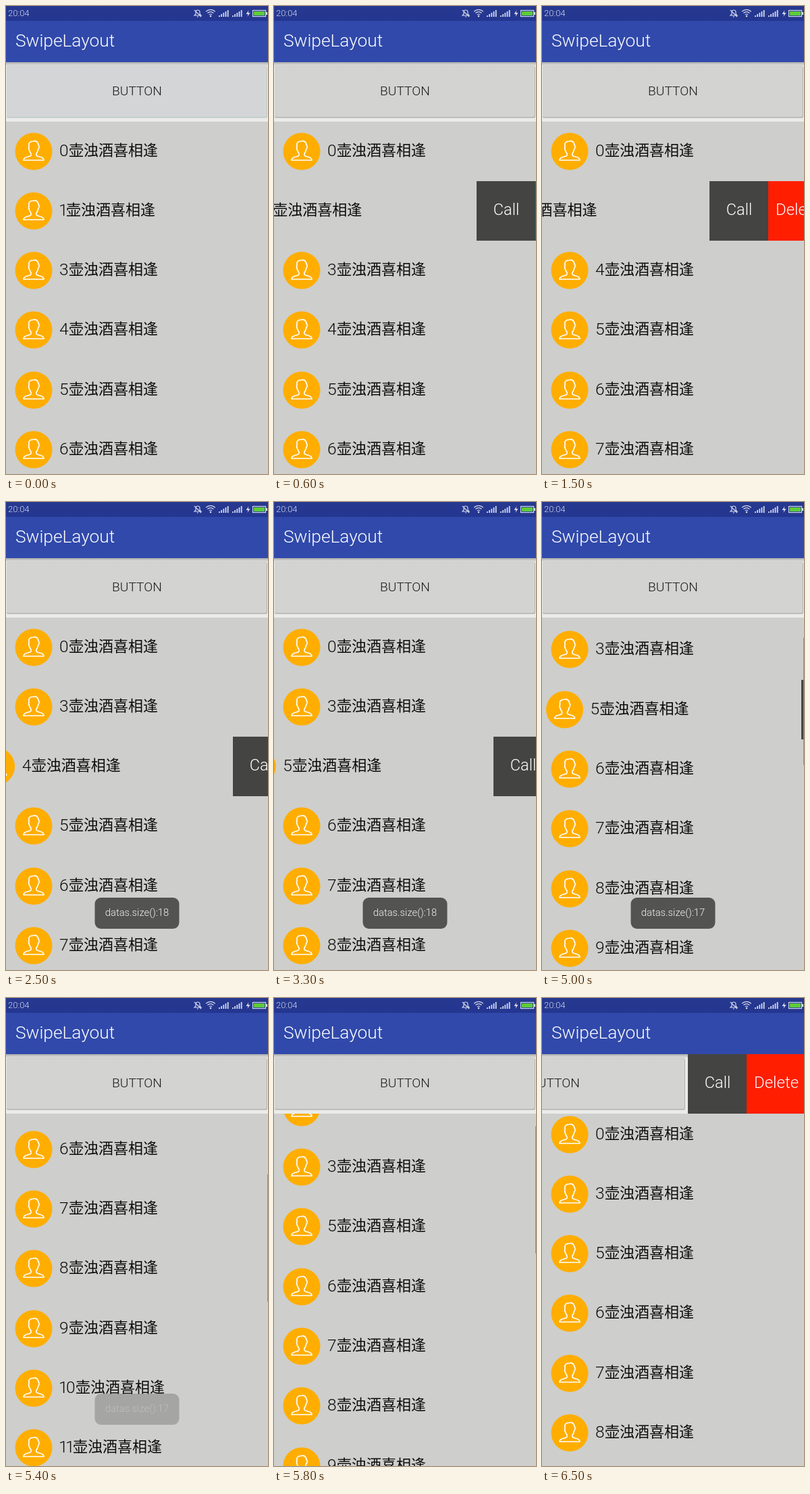
Recreate the animation shown at these times as an HTML page with a canvas. Size 388 px wide and 692 px high, loop 8000 ms.

```html
<!DOCTYPE html>
<html lang="zh">
<head>
<meta charset="utf-8">
<title>SwipeLayout</title>
<style>
html, body { margin: 0; width: 100%; height: 100%; overflow: hidden; background: #cececc; }
canvas { display: block; }
</style>
</head>
<body>
<canvas id="stage" width="388" height="692"></canvas>
<script>
const W = 388, H = 692, LOOP = 8000, STEP = 100;
const LIST_TOP = 171, ROW = 88.3, MENU_X = 391, OPEN = 175;
const LATIN = 'Roboto, sans-serif';
const CJK = '"Noto Sans CJK SC", "Noto Sans CJK", sans-serif';
const c = document.getElementById('stage').getContext('2d');

const person = new Path2D('M-4 3C-3 7-5 7-9 8C-13 9-15 10-15 13H15C15 10 13 9 9 8C5 7 3 7 4 3C6 1 6-1 7-4C9-5 8-8 7-10C6-14 3-16-1-15C-6-15-8-12-7-8C-7-6-8-5-7-3C-6-1-6 1-4 3Z');
const bell = new Path2D('M-5 3H5L3 1V-2C3-6-3-6-3-2V1ZM-1 5H1M-5-5L5 5');
const bolt = new Path2D('M1-5L-3 1H0L-1 5L3-1H0Z');

function box(x, y, w, h, color) {
  c.fillStyle = color;
  c.fillRect(x, y, w, h);
}

function roundBox(x, y, w, h, r, color) {
  c.fillStyle = color;
  c.beginPath();
  c.roundRect(x, y, w, h, r);
  c.fill();
}

function text(str, x, y, size, color, align = 'left', family = LATIN) {
  c.font = `${family === LATIN ? 300 : 400} ${size}px ${family}`;
  c.fillStyle = color;
  c.textAlign = align;
  c.fillText(str, x, y);
}

function shade(y0, y1, from, to) {
  const g = c.createLinearGradient(0, y0, 0, y1);
  g.addColorStop(0, from);
  g.addColorStop(1, to);
  box(0, y0, W, y1 - y0, g);
}

const progress = (t, from, to) => Math.min(1, Math.max(0, (t - from) / (to - from)));
const smooth = p => p * p * (3 - 2 * p);

// A finger drags a row open; a released row springs shut.
const drag = (t, from, to) => OPEN * smooth(progress(t, from, to));
const shut = (t, from) => OPEN * (1 - progress(t, from, from + 512)) ** 5;

const firstSwipe = t => t < 1500 ? drag(t, 180, 1000) : shut(t, 1480);

function secondSwipe(t) {
  if (t < 3300) return drag(t, 2380, 2700);
  if (t < 3900) return shut(t, 3209);
  return t < 4800 ? drag(t, 3880, 4300) : shut(t, 4760);
}

const buttonSwipe = t => drag(t, 5980, 6500);
const scrollAt = t => 267 * smooth(progress(t, 4700, 5500)) - 254 * smooth(progress(t, 5500, 5900));
const barAlpha = t => t < 4800 ? 0 : 1 - progress(t, 6100, 6500);

function toastAlpha(t) {
  if (t < 3600) return progress(t, 1500, 2000) - progress(t, 3300, 3600);
  return progress(t, 3500, 3800) - progress(t, 5200, 5500);
}

function drawMenu(y, off) {
  if (off < .5) return;
  const x = Math.round(MENU_X - off);
  box(x, y, 87, 88, '#444442');
  box(x + 87, y, 88, 88, '#ff1e00');
  text('Call', x + 44, y + 50, 23.5, '#fff', 'center');
  text('Delete', x + 131, y + 50, 24, '#fff', 'center');
}

function drawRow(id, y, off) {
  const x = -off;
  c.fillStyle = '#ffae00';
  c.beginPath();
  c.arc(x + 41, y + 44, 27.5, 0, 7);
  c.fill();
  c.save();
  c.translate(x + 41, y + 44);
  c.strokeStyle = '#fff';
  c.lineWidth = 1.7;
  c.lineJoin = 'round';
  c.stroke(person);
  c.restore();

  let pen = x + 79;
  for (const d of String(id)) {
    const one = d === '1';
    text(d, pen - (one ? 1 : 0), y + 51, 24.5, '#0c0c0c');
    pen += one ? 10 : 14;
  }
  text('壶浊酒喜相逢', pen, y + 50, 22, '#0c0c0c', 'left', CJK);
}

function drawList(t) {
  const scroll = scrollAt(t);
  const swipes = { 1: firstSwipe(t), 2: secondSwipe(t) };
  const gone = [2];
  if (t >= 1500) gone.push(1);
  if (t >= 3300) gone.push(4);
  const ids = [...Array(20).keys()].filter(id => !gone.includes(id));

  c.save();
  c.beginPath();
  c.rect(0, LIST_TOP, W, H - LIST_TOP);
  c.clip();
  ids.forEach((id, i) => {
    const y = Math.floor(LIST_TOP + i * ROW - scroll), off = swipes[i] || 0;
    if (y < LIST_TOP - ROW || y > H) return;
    drawRow(id, y, off);
    drawMenu(y, off);
  });
  c.globalAlpha = barAlpha(t);
  box(387, LIST_TOP + scroll * .352, 1, 188, '#8b8b89');
  c.restore();
}

function drawButton(t) {
  const off = buttonSwipe(t);
  box(0, 83, W, 88, '#ebebea');
  roundBox(1 - off, 89, 386, 76.5, 2, t < 300 ? '#bccac5' : '#b0b0ae');
  roundBox(1 - off, 88, 385, 76, 2, t < 300 ? '#d4d5d6' : '#d3d3d1');
  text('BUTTON', 194 - off, 132, 19.2, '#1c1c1c', 'center');
  shade(83, 89, 'rgba(90,90,90,.45)', 'rgba(90,90,90,0)');
  drawMenu(83, off);
}

function drawBars() {
  shade(0, 22, '#26388f', '#243690');
  box(0, 22, W, 61, '#3049ab');
  text('SwipeLayout', 14, 60, 26.3, '#fff');

  const ink = '#d3d8ec';
  text('20:04', 3, 15, 13, ink);
  c.strokeStyle = ink;
  c.lineWidth = 1.2;
  c.save();
  c.translate(284, 11);
  c.stroke(bell);
  c.restore();
  for (const r of [3, 6.3, 9.6]) {
    c.beginPath();
    c.arc(303, 15, r, -Math.PI * .75, -Math.PI * .25);
    c.stroke();
  }
  c.fillStyle = ink;
  c.beginPath();
  c.arc(303, 15, 1.3, 0, 7);
  c.fill();
  for (const x of [315, 335])
    for (let i = 0; i < 5; i++) box(x + i * 3.2, 14 - i * 2, 1.8, 2 + i * 2, ink);
  c.save();
  c.translate(358.5, 11);
  c.fill(bolt);
  c.restore();
  c.strokeRect(365.5, 6.5, 19, 9);
  box(367, 8, 16, 6, '#5ecb3a');
  box(385, 9, 2, 4, ink);
}

function drawToast(t) {
  c.globalAlpha = toastAlpha(t);
  roundBox(131.5, 585, 125, 46, 9, '#535351');
  text(`datas.size():${t < 3600 ? 18 : 17}`, 194, 612, 14.8, '#f4f4f4', 'center');
  c.globalAlpha = 1;
}

function draw(now) {
  const t = Math.floor(now % LOOP / STEP) * STEP;
  box(0, 0, W, H, '#cececc');
  drawList(t);
  drawButton(t);
  drawBars();
  drawToast(t);
}

const begin = performance.now();
function frame() {
  draw(performance.now() - begin);
  requestAnimationFrame(frame);
}
frame();
</script>
</body>
</html>
```
